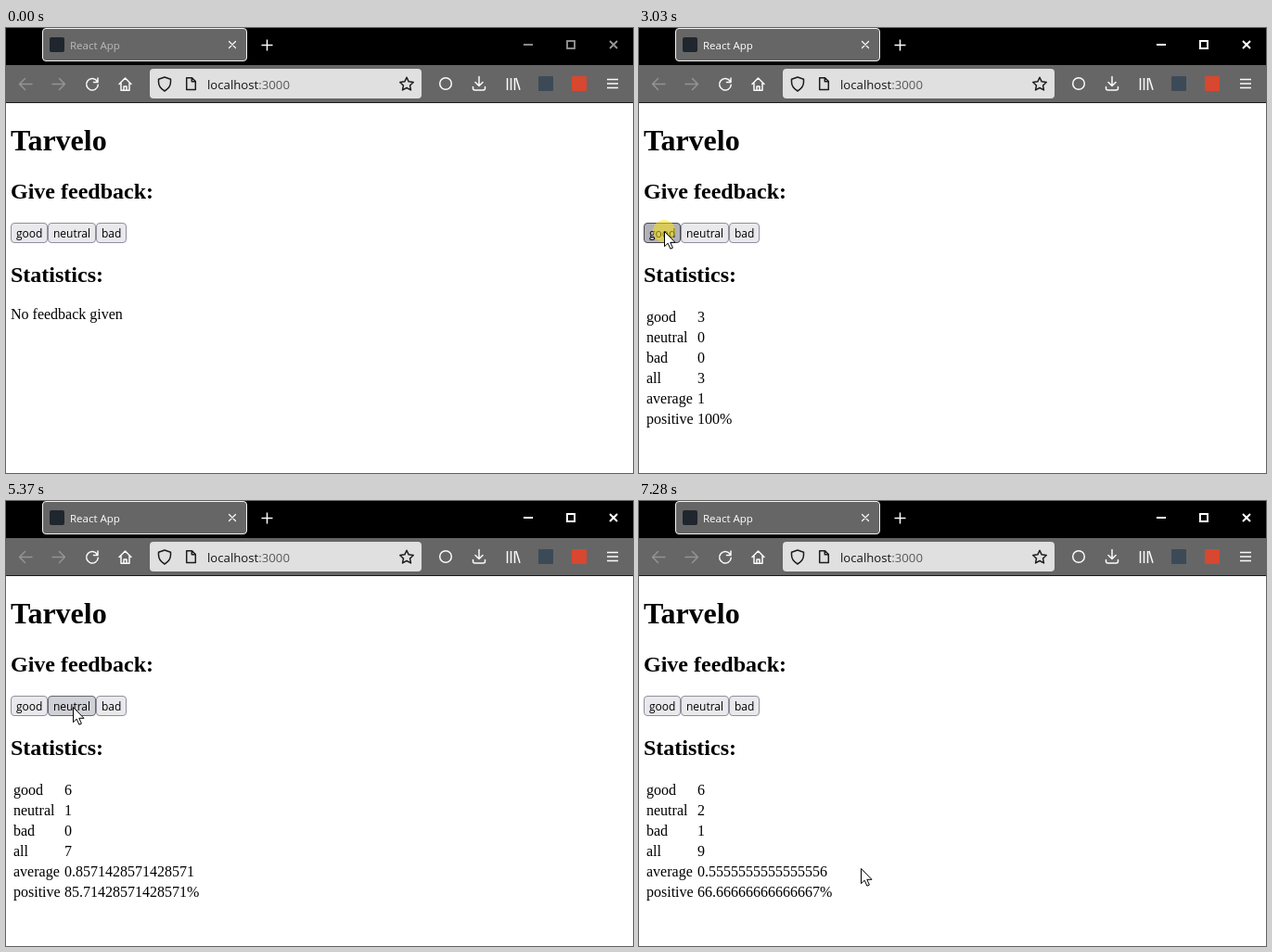
An HTML page for the animation above (7.32 s loop, 676 by 480 pixels).

```html
<!DOCTYPE html>
<html lang="en">
<head>
<meta charset="utf-8">
<title>Feedback</title>
<style>
  html, body { margin: 0; width: 100%; height: 100%; overflow: hidden; background: #fff; }
  svg { display: block; width: 676px; height: 480px; }
  .ui { font-family: "Open Sans", "Noto Sans", sans-serif; }
  .page { font: 16px "Liberation Serif", "Times New Roman", serif; }
  .page .h1 { font-size: 32px; font-weight: bold; }
  .page .h2 { font-size: 24px; font-weight: bold; }
  .icon { fill: none; stroke: #fbfbfe; stroke-width: 1.5; stroke-linecap: round; stroke-linejoin: round; }
  .dim { stroke: #949494; }
  .dark { stroke: #1c1c1f; }
  .sharp { stroke-linecap: butt; stroke-linejoin: miter; }
  .button rect { fill: #e9e9ed; stroke: #8f8f9d; }
  .button.hover rect { fill: #d0d0d7; stroke: #676774; }
  .button.down rect { fill: #b1b1b9; stroke: #484851; }
  .button text { font-size: 12px; }
  #tabTitle { fill: #fff; font-size: 11.5px; }
  #controls { stroke: #fff; stroke-width: 2; }
  .inactive #tabTitle { fill: #bababa; }
  .inactive #controls { stroke: #999; stroke-width: 1.8; }
</style>
</head>
<body>
<svg id="stage" class="inactive" viewBox="0 0 676 480">
  <rect width="676" height="480" fill="#fff"/>

  <!-- tab strip -->
  <rect width="676" height="40"/>
  <rect x="39.5" y=".5" width="220" height="35" rx="3.5" fill="#666" stroke="#f4f4f4"/>
  <rect x="47" y="10" width="16" height="16" rx="2" fill="#20262e"/>
  <text id="tabTitle" class="ui" x="69" y="23">React App</text>
  <path class="icon" stroke-width="1.2" d="M240.5 14.5l7 7m0-7l-7 7" style="stroke-width:1.2"/>
  <path class="icon sharp" d="M275.5 18.5h12m-6-6v12"/>
  <g id="controls" fill="none">
    <path d="M558 18h10"/>
    <rect x="605" y="14" width="8" height="8"/>
    <path d="M651 14l8 8m0-8l-8 8"/>
  </g>

  <!-- toolbar -->
  <rect y="40" width="676" height="41" fill="#666"/>
  <rect y="80" width="676" height="1" fill="#1a1a1a"/>
  <rect x="155" y="44" width="293" height="32" rx="4" fill="#e0e0e0"/>
  <path class="icon dim" d="M28 60.5H14.5m6-6l-6 6 6 6"/>
  <path class="icon dim" d="M50 60.5h13.5m-6-6l6 6-6 6"/>
  <path class="icon" d="M98.3 57.3a6.3 6.3 0 1 0 1 4M99 54v4.5h-4.5"/>
  <path class="icon" d="M122 60.5l6.500-6.500 6.500 6.500M124 59.500v7.700h9v-7.700M127 67v-4h3v4"/>
  <path class="icon dark" d="M171 53l6.500 2.300v3c0 5-3 7.700-6.500 9.700-3.500-2-6.500-4.700-6.500-9.700v-3z"/>
  <path class="icon dark" d="M194.700 53.700h5.800l3.800 3.800v9h-9.600zM200.300 54v3.800h3.800"/>
  <text class="ui" x="217" y="66" font-size="13.2" fill="#141418">localhost<tspan fill="#5a5a5e">:3000</tspan></text>
  <path id="star" class="icon dark"/>
  <circle class="icon" cx="474" cy="60" r="6.300"/>
  <path class="icon" d="M510 52.500v10m-4-4l4 4 4-4M503.500 63.500v1.500q0 2 2 2h9q2 0 2-2v-1.500"/>
  <path class="icon sharp" d="M540.500 54v13m4-13v13m4-13v13m1.500-13l4 12.700"/>
  <rect x="574" y="52" width="16" height="16" rx="1" fill="#3c4a57"/>
  <rect x="610" y="52" width="16" height="16" rx="1" fill="#d8472f"/>
  <path class="icon sharp" d="M648 55.500h12m-12 4.500h12m-12 4.500h12"/>

  <!-- page -->
  <g class="page">
    <text class="h1" x="5" y="132">Tarvelo</text>
    <text class="h2" x="5" y="184">Give feedback:</text>
    <text class="h2" x="5" y="274">Statistics:</text>
    <text id="empty" x="5" y="314">No feedback given</text>
    <g id="table"></g>
  </g>
  <g id="buttons" class="ui"></g>
  <circle id="press" r="12" fill="#ffe600" fill-opacity=".5"/>
  <path id="cursor" fill="#fff" stroke="#000" stroke-linejoin="round"
        d="M.5.5v16.200l3.700-3.500 2.700 6 2.500-1.100-2.600-5.800h5.200z"/>
</svg>
<script>
const LOOP = 7320;
const PRESS = 130;
const APPEAR = 480;
const $ = id => document.getElementById(id);

function add(parent, tag, attrs, text = "") {
  const el = document.createElementNS("http://www.w3.org/2000/svg", tag);
  for (const key in attrs) el.setAttribute(key, attrs[key]);
  el.textContent = text;
  parent.appendChild(el);
  return el;
}

const starPoints = Array.from({ length: 10 }, (_, i) => {
  const r = i % 2 ? 3.7 : 7.6, a = i * Math.PI / 5;
  return (432 + r * Math.sin(a)).toFixed(2) + " " + (60.8 - r * Math.cos(a)).toFixed(2);
});
$("star").setAttribute("d", "M" + starPoints.join("L") + "Z");

const buttons = [["good", 5, 40], ["neutral", 45, 52], ["bad", 97, 33]].map(([label, x, width]) => {
  const el = add($("buttons"), "g", { class: "button" });
  add(el, "rect", { x: x + .5, y: 210.5, width: width - 1, height: 21, rx: 3.5 });
  add(el, "text", { x: x + 6, y: 226 }, label);
  return { el, x, width };
});

const cells = ["good", "neutral", "bad", "all", "average", "positive"].map((label, i) => {
  const y = 317 + 22 * i;
  add($("table"), "text", { x: 8, y }, label);
  return add($("table"), "text", { x: 63, y });
});

// press times for each button
const clicks = [
  [1600, 2130, 2560, 2990, 3420, 3900],
  [5020, 5400],
  [6250]
];

// time, x, y of the pointer tip
const path = [
  [APPEAR, 170, 292], [820, 25, 213], [1250, 25, 213], [1500, 27, 219],
  [4000, 27, 219], [4500, 28, 218], [4640, 28, 218], [4900, 72, 222],
  [5560, 72, 222], [5900, 112, 225], [6560, 112, 225], [7200, 239, 396], [LOOP, 239, 396]
];

function pointer(t) {
  const i = Math.max(1, path.findIndex(p => p[0] > t));
  const [t0, x0, y0] = path[i - 1], [t1, x1, y1] = path[i];
  const u = Math.min(1, Math.max(0, (t - t0) / (t1 - t0)));
  const k = u * u * (3 - 2 * u);
  return [x0 + (x1 - x0) * k, y0 + (y1 - y0) * k];
}

const show = (el, on) => el.setAttribute("visibility", on ? "visible" : "hidden");

function draw(t) {
  const [x, y] = pointer(t);
  const visible = t >= APPEAR;
  const counts = clicks.map(list => list.filter(c => t >= c + PRESS).length);
  const [good, neutral, bad] = counts;
  const all = good + neutral + bad;
  let pressed = false;

  buttons.forEach((b, i) => {
    const down = clicks[i].some(c => t >= c && t < c + PRESS);
    const hover = visible && x >= b.x && x < b.x + b.width && y >= 210 && y < 232;
    b.el.setAttribute("class", "button" + (down ? " down" : hover ? " hover" : ""));
    pressed = pressed || down;
  });

  const values = [good, neutral, bad, all, (good - bad) / all, 100 * good / all + "%"];
  cells.forEach((cell, i) => { cell.textContent = values[i]; });
  show($("empty"), !all);
  show($("table"), all);
  show($("press"), pressed);
  show($("cursor"), visible);
  $("stage").classList.toggle("inactive", t < clicks[0][0]);

  const move = `translate(${x.toFixed(1)} ${y.toFixed(1)})`;
  $("press").setAttribute("transform", move);
  $("cursor").setAttribute("transform", move);
}

const start = performance.now();
function tick() {
  draw((performance.now() - start) % LOOP);
  requestAnimationFrame(tick);
}
tick();
</script>
</body>
</html>
```
